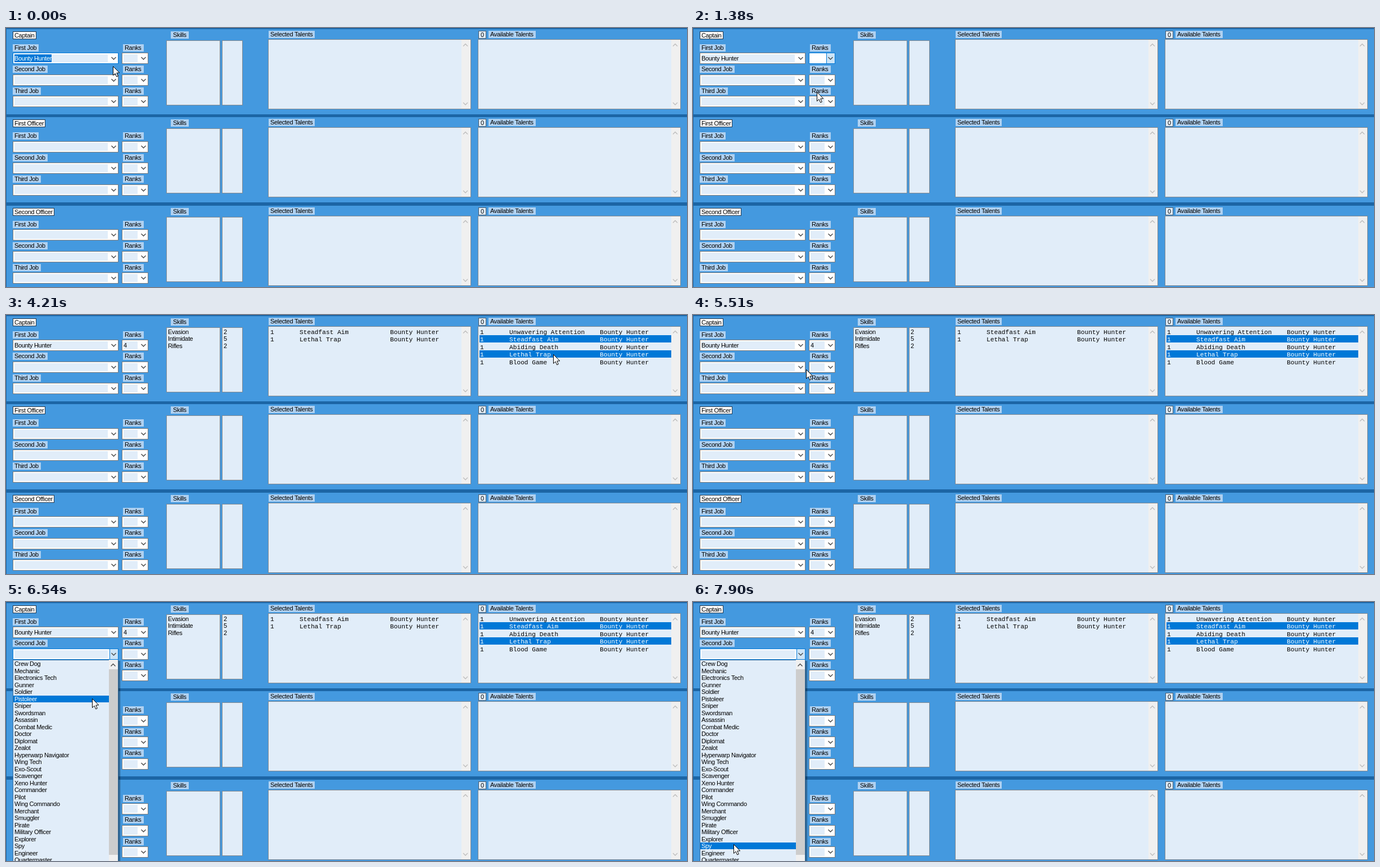
An HTML page with a canvas that plays this animation: 1211 by 462 pixels, repeating every 8 s.

```html
<!DOCTYPE html>
<html lang="en">
<head>
<meta charset="utf-8">
<title>Crew builder</title>
<style>
html, body { margin: 0; width: 100%; height: 100%; overflow: hidden; background: #4499df; }
canvas { display: block; }
</style>
</head>
<body>
<canvas id="stage" width="1211" height="462"></canvas>
<script>
const ctx = document.getElementById('stage').getContext('2d');
const LOOP = 8000;
const BLUE = '#0078d7', FIELD = '#e1edf9', LABEL = '#afd1f1', GREY = '#7a7a7a', DARK = '#1c65a5';
const PITCH = 157.5, JOB_PITCH = 38.5, ROW = 12.5, TALENT_ROW = 13.5;
const UI = '11px "Liberation Sans", Arial, sans-serif';
const MONO = '11.2px "Liberation Mono", "Courier New", monospace';

const officers = ['Captain', 'First Officer', 'Second Officer'];
const jobSlots = ['First Job', 'Second Job', 'Third Job'];
const jobs = ['Crew Dog', 'Mechanic', 'Electronics Tech', 'Gunner', 'Soldier', 'Pistoleer',
  'Sniper', 'Swordsman', 'Assassin', 'Combat Medic', 'Doctor', 'Diplomat', 'Zealot',
  'Hyperwarp Navigator', 'Wing Tech', 'Exo-Scout', 'Scavenger', 'Xeno Hunter', 'Commander',
  'Pilot', 'Wing Commando', 'Merchant', 'Smuggler', 'Pirate', 'Military Officer', 'Explorer',
  'Spy', 'Engineer', 'Quartermaster', 'Wing Bomber'];
const ranks = Array.from({ length: 30 }, (_, i) => String(i + 1));
const skills = [['Evasion', 2], ['Intimidate', 5], ['Rifles', 2]];
const talents = ['Unwavering Attention', 'Steadfast Aim', 'Abiding Death', 'Lethal Trap', 'Blood Game'];

// The screen refreshes in bursts: [first, last, count]
const bursts = [[0, 0, 1], [120, 1110, 8], [1260, 2280, 9], [2400, 3420, 9], [3540, 3930, 4],
  [4210, 4210, 1], [4520, 5510, 8], [5670, 6670, 8], [6820, 7770, 8], [7900, 7900, 1]];
const ticks = bursts.flatMap(([a, b, n]) =>
  Array.from({ length: n }, (_, i) => n > 1 ? Math.floor((a + (b - a) * i / (n - 1)) / 10 + 1e-6) * 10 : a));

// Pointer path: time, x, y
const path = [[0, 190, 68], [400, 243, 54], [540, 243, 54], [1110, 220, 113], [1380, 220, 114],
  [1510, 220, 114], [2280, 560, 34], [2780, 808, 39], [3300, 938, 42], [3420, 938, 42],
  [3930, 985, 68], [4210, 973, 70], [4400, 973, 70], [5510, 201, 97], [5670, 190, 95],
  [6100, 190, 95], [6670, 140, 200], [7090, 93, 317], [7770, 71, 431], [7900, 72, 432]];

const clamp = v => Math.max(0, Math.min(1, v));

function pointerAt(t) {
  const i = path.findIndex(p => p[0] >= t);
  if (i <= 0) return i ? path[path.length - 1].slice(1) : path[0].slice(1);
  const a = path[i - 1], b = path[i], k = (t - a[0]) / (b[0] - a[0]);
  return [1, 2].map(n => Math.round(a[n] + (b[n] - a[n]) * k));
}

function rect(x, y, w, h, fill) {
  ctx.fillStyle = fill;
  ctx.fillRect(x, y, w, h);
}

function frame(x, y, w, h, fill, edge) {
  rect(x, y, w, h, edge);
  rect(x + 1, y + 1, w - 2, h - 2, fill);
}

// y is the middle of the text line
function text(s, x, y, color = '#000', font = UI) {
  ctx.font = font;
  ctx.letterSpacing = font === UI ? '-0.33px' : '0px';
  ctx.fillStyle = color;
  ctx.fillText(s, x, Math.round(y + 3.9));
}

function widthOf(s) {
  ctx.font = UI;
  ctx.letterSpacing = '-0.33px';
  return Math.round(ctx.measureText(s).width);
}

function label(s, x, y, pad = 3) {
  rect(x, y, widthOf(s) + pad + 4, 13, LABEL);
  text(s, x + pad, y + 6.5);
}

function chevron(x, y, color, dir = 1) {
  ctx.strokeStyle = color;
  ctx.lineWidth = 1.3;
  ctx.beginPath();
  ctx.moveTo(x - 4, y - 2 * dir);
  ctx.lineTo(x, y + 2 * dir);
  ctx.lineTo(x + 4, y - 2 * dir);
  ctx.stroke();
}

// mode: '', 'focus', 'open', 'press'
function combo(x, y, w, value = '', mode = '', selected = false, field = FIELD) {
  frame(x, y, w, 20, '#fff', mode === 'focus' || mode === 'open' ? BLUE : GREY);
  rect(x + 3, y + 3, w - 22, 14, field);
  if (mode === 'open') frame(x + w - 16, y, 16, 20, '#cce4f7', BLUE);
  if (mode === 'press') frame(x, y, w - 15, 20, FIELD, '#111');
  chevron(x + w - 8.5, y + 10, '#444');
  if (selected) rect(x + 3, y + 3, widthOf(value), 14, BLUE);
  text(value, x + 3, y + 10, selected ? '#fff' : '#000');
}

function talentBox(x, y) {
  frame(x, y, 361, 125, FIELD, '#85898e');
  rect(x + 344, y + 1, 16, 123, '#f0f0f0');
  chevron(x + 351, y + 10.5, '#bdbdbd', -1);
  chevron(x + 351, y + 115, '#bdbdbd');
}

function talentRow(x, i, name, hot) {
  const y = 29.6 + TALENT_ROW * i, color = hot ? '#fff' : '#000';
  if (hot) rect(x + 2, Math.round(y - 6.8), 341, 13, BLUE);
  [['1', 3], [name, 55], ['Bounty Hunter', 216]].forEach(([s, dx]) => text(s, x + dx, y, color, MONO));
}

function dropdown(x, top, w, items, amount, pointerY, scrolls) {
  if (amount <= 0) return;
  const full = items.length * ROW + 2, h = Math.round(full * amount);
  const shift = h - full, inner = scrolls ? w - 18 : w - 2;
  for (let i = 4; i > 0; i--) rect(x + 4, top + 2, w - 4 + i, h - 2 + i, 'rgba(0,0,0,.12)');
  frame(x, top, w, h, FIELD, '#3c6f9c');
  ctx.save();
  ctx.beginPath();
  ctx.rect(x + 1, top, w - 2, h - 1);
  ctx.clip();
  const hot = amount < 1 ? -1 : Math.floor((pointerY - 1.5 - top - 1) / ROW);
  items.forEach((s, i) => {
    const y = top + 1 + i * ROW + shift;
    if (i === hot) rect(x + 1, Math.round(y), inner, 12, BLUE);
    text(s, x + 3, y + 6.4, i === hot ? '#fff' : '#000');
  });
  if (scrolls) {
    const sx = x + w - 17, sy = top + shift;
    rect(sx, sy, 16, full, '#f0f0f0');
    rect(sx, sy + 17, 16, 331, '#cdcdcd');
    chevron(sx + 7.5, sy + 9.5, '#444', -1);
    chevron(sx + 7.5, sy + 367, '#444');
  }
  ctx.restore();
}

function pointer(x, y) {
  const shape = [[0, 0], [0, 16], [3.6, 12.6], [6.2, 18.4], [8.8, 17.3], [6.3, 11.6], [11.3, 11.4]];
  ctx.beginPath();
  shape.forEach(([dx, dy]) => ctx.lineTo(x + .5 + dx, y + .5 + dy));
  ctx.closePath();
  ctx.fillStyle = '#fff';
  ctx.fill();
  ctx.strokeStyle = '#000';
  ctx.lineWidth = 1;
  ctx.stroke();
}

function panel(n, t) {
  const oy = n * PITCH, at = y => Math.round(oy + y - .01), first = n === 0;
  frame(12, at(6), widthOf(officers[n]) + 6, 14, '#fff', '#26384a');
  text(officers[n], 15, at(6) + 7);

  jobSlots.forEach((name, i) => {
    const y = at(29 + i * JOB_PITCH), box = at(44.4 + i * JOB_PITCH);
    label(name, 12, y);
    label('Ranks', 208, y);
    let job = [], rank = [];
    if (first && i === 0) {
      job = t < 540 ? ['Bounty Hunter', 'focus', true] : ['Bounty Hunter'];
      if (t >= 540) rank = ['', 'open', false, '#fff'];
      if (t >= 1500) rank = ['4', t < 3530 ? 'focus' : '', t < 3400];
    }
    if (first && i === 1 && t >= 5800) job = ['', t < 6090 ? 'press' : 'open'];
    combo(12, box, 188, ...job);
    combo(206, box, 47, ...rank);
  });

  label('Skills', 293, at(6), 4);
  frame(285, at(22), 96, 116, FIELD, '#85898e');
  frame(384, at(22), 37, 116, FIELD, '#85898e');
  label('Selected Talents', 467, at(5));
  talentBox(466, at(20));
  const count = !first || t < 1500 ? 0 : t < 3530 ? 2 : t < 4210 ? 1 : 0;
  frame(840, at(5), 14, 14, FIELD, '#4c5c6c');
  text(count, 844, at(5) + 7);
  label('Available Talents', 858, at(5));
  talentBox(839, at(20));
}

function captainData(t) {
  if (t < 1500) return;
  skills.forEach(([name, level], i) => {
    text(name, 288, 30 + i * ROW);
    text(level, 387, 30 + i * ROW);
  });
  if (t >= 3530) talentRow(467, 0, talents[1]);
  if (t >= 4210) talentRow(467, 1, talents[3]);
  if (t >= 5800 && t < 6090) return;
  talents.forEach((name, i) =>
    talentRow(840, i, name, i === 1 && t >= 3400 || i === 3 && t >= 4210));
}

function draw(time) {
  const t = ticks.filter(v => v <= time).pop();
  const [px, py] = pointerAt(t);
  rect(0, 0, 1211, 462, '#4499df');
  rect(0, 0, 1, 462, DARK);
  rect(0, 0, 1211, 2, DARK);
  rect(0, 154, 1211, 5, DARK);
  rect(0, 311, 1211, 6, DARK);
  officers.forEach((_, n) => panel(n, t));
  captainData(t);

  if (t < 1380) dropdown(206, 64, 47, ranks, clamp((t - 520) / 190), py, false);
  dropdown(12, 103, 188, jobs, clamp((t - 5770) / 190), py, true);
  // caret blink
  if (t >= 5800 && Math.floor((t - 5800) / 530) % 2 === 0) rect(15, 86, 1, 13, '#000');
  pointer(px, py);
}

const start = performance.now();
function tick() {
  draw((performance.now() - start) % LOOP);
  requestAnimationFrame(tick);
}
tick();
</script>
</body>
</html>
```
